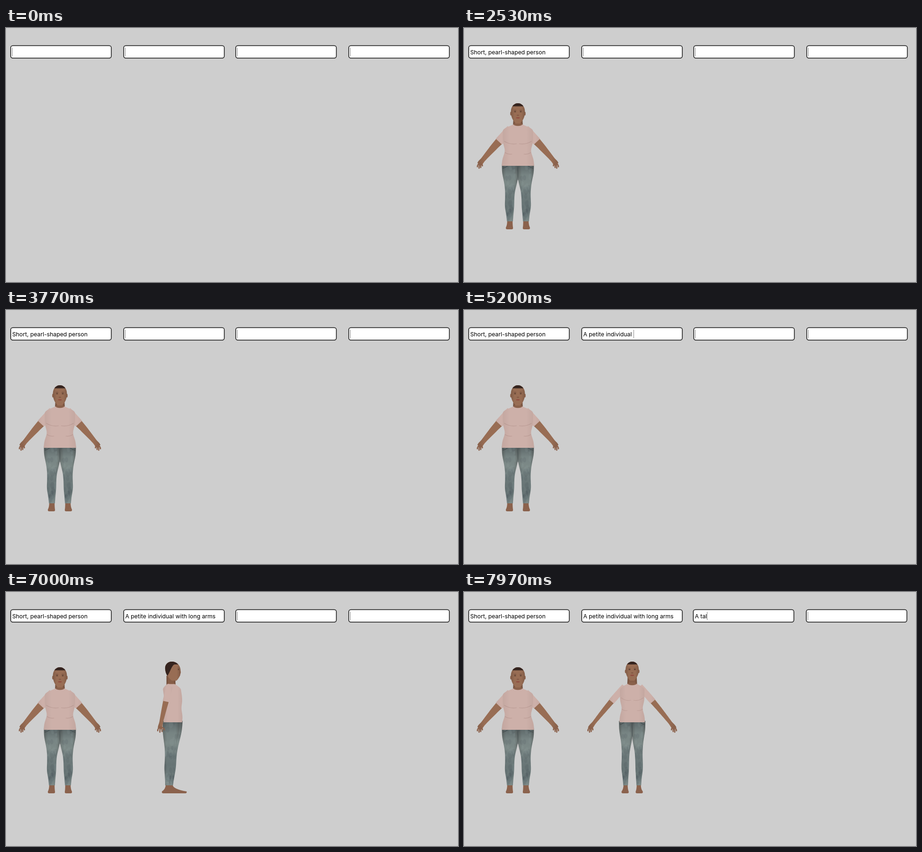
Write an HTML page with a canvas that moves like this. It is 960 by 540 pixels and loops after 8 s.

```html
<!DOCTYPE html>
<html lang="en">
<head>
<meta charset="utf-8">
<title>Body descriptions</title>
<style>
html, body { margin: 0; width: 100%; height: 100%; overflow: hidden; background: #cecece; }
canvas { display: block; }
</style>
</head>
<body>
<canvas id="stage" width="960" height="540"></canvas>
<script>
const ctx = document.getElementById('stage').getContext('2d');
const LOOP = 8000, TURN = 1200, SHIFT_AT = 7700, GROUND = 428, ANKLE_Y = 411;
const SKIN = '#986d54', SHIRT = '#cdb0a9', HAIR = '#35241f', FOOT = '#8b624d';

// cues: [time, characters shown], steady typing in between
const boxes = [
  { x: 10, text: 'Short, pearl-shaped person', done: 2370,
    cues: [[130, 1], [500, 6], [830, 8], [1530, 14], [2230, 26]] },
  { x: 250, text: 'A petite individual with long arms', done: 6500,
    cues: [[3800, 1], [4430, 12], [6370, 34]] },
  { x: 488, text: 'A tal', cues: [[7740, 1], [7950, 5]], shifts: true },
  { x: 728, text: '', cues: [], shifts: true }
];

const people = [
  { cx: 114.5, start: 2530, top: 160, head: 1, collar: 205, hem: 293, chest: 32, dip: 5, flare: 2.5,
    depth: .82, hip: 17, ankle: 6, shoulder: [15, 215], hand: [80, 287], upperArm: 9.5, wrist: 4 },
  { cx: 357.2, start: 6640, top: 148, head: .94, collar: 195, hem: 277, chest: 26, dip: 4, flare: 1,
    depth: .72, hip: 14, ankle: 4.7, shoulder: [16, 201], hand: [88, 287], upperArm: 6.8, wrist: 3.3 }
];

const lerp = (a, b, u) => a + (b - a) * u;
const clamp = u => Math.min(1, Math.max(0, u));
const smooth = u => (u = clamp(u), u * u * (3 - 2 * u));
const bump = (u, mid, width) => Math.exp(-(((u - mid) / width) ** 2));
const sample = (n, f) => Array.from({ length: n + 1 }, (_, i) => f(i / n));

let seed = 7;
const random = () => (seed = seed * 16807 % 2147483647) / 2147483647;
const blotches = sample(70, () => ({ az: random() * 7, v: random(), size: 2 + 4 * random(), light: random() < .5 }));

// Body sections are {x, y, z, a, b}: centre, half width and half depth.
const torsoAt = p => u => {
  const a = 9 + (p.chest - 9) * Math.sin(clamp(u / .16) * Math.PI / 2) -
    p.dip * bump(u, .64, .16) + p.flare * u * u;
  return { x: 0, y: lerp(p.collar, p.hem, u), z: 6 * Math.sin(2.4 * u) - 7, a, b: a * p.depth };
};

const legAt = (p, side) => v => {
  const a = p.ankle + (p.hip - p.ankle) * (1 - smooth((v - .1) / .6) + .35 * bump(v, .7, .2));
  const x = p.hip - 1.5 * bump(v, .3, .15) + .8 * bump(v, .72, .15);
  return { x: x * side, y: lerp(p.hem - 3, ANKLE_Y, v), z: -3 - 8 * v, a, b: a * lerp(1.3, 1.1, v) };
};

const armAt = (p, side) => u => ({
  x: side * (lerp(p.shoulder[0], p.hand[0], u) + 1.5 * Math.sin(Math.PI * u)),
  y: lerp(p.shoulder[1], p.hand[1], u),
  z: lerp(-7, -12, u),
  r: lerp(p.upperArm, p.wrist, u ** 1.4) + 1.4 * bump(u, 1, .07)
});

const skullAt = p => u => {
  const v = u * 43, down = clamp((v - 17) / 26);
  const a = 14.8 * p.head * (v < 17 ? Math.sqrt(1 - ((17 - v) / 17.2) ** 2) : 1 - .7 * down ** 2.5);
  return { x: 0, y: p.top + v * p.head, z: -5 + 5 * u, a, b: a * 1.17 };
};

function fillPolygon(points, fill, shade) {
  const path = new Path2D();
  points.forEach(([x, y]) => path.lineTo(x, y));
  path.closePath();
  ctx.fillStyle = fill;
  ctx.fill(path);
  const xs = points.map(p => p[0]);
  const edge = ctx.createLinearGradient(Math.min(...xs), 0, Math.max(...xs), 0);
  for (const stop of [0, .25, .75, 1]) edge.addColorStop(stop, `rgba(30,20,15,${stop % 1 ? 0 : shade})`);
  ctx.fillStyle = edge;
  ctx.fill(path);
  return path;
}

function ellipse(x, y, rx, ry, fill) {
  ctx.fillStyle = fill;
  ctx.beginPath();
  ctx.ellipse(x, y, rx, ry, 0, 0, 7);
  ctx.fill();
}

function drawPerson(p, angle) {
  const cos = Math.cos(angle), sin = Math.sin(angle);
  const sx = (x, z) => p.cx + x * cos + z * sin;
  const span = ({ a, b }) => Math.hypot(a * cos, b * sin);

  function column(sections, fill, shade) {
    const edge = dir => sections.map(s => [sx(s.x, s.z) + dir * span(s), s.y]);
    return fillPolygon([...edge(-1), ...edge(1).reverse()], fill, shade);
  }

  function tube(sections, fill, shade) {
    const pts = sections.map(s => [sx(s.x, s.z), s.y]);
    const edge = dir => pts.map(([x, y], i) => {
      const a = pts[Math.max(i - 1, 0)], b = pts[Math.min(i + 1, pts.length - 1)];
      const dx = b[0] - a[0], dy = b[1] - a[1], k = dir * sections[i].r / Math.hypot(dx, dy);
      return [x - dy * k, y + dx * k];
    });
    fillPolygon([...edge(-1), ...edge(1).reverse()], fill, shade);
  }

  function drawArm(side) {
    const at = armAt(p, side), [hx, hy] = p.hand;
    tube(sample(30, u => at(lerp(.25, 1.04, u))), SKIN, .15);
    ctx.strokeStyle = '#8c624c';
    ctx.lineWidth = 2.7;
    ctx.lineCap = 'round';
    ctx.beginPath();
    for (let finger = 0; finger < 4; finger++) {
      const x = sx((hx + 6 - 3.5 * finger) * side, 4 * finger - 16);
      const length = 8 + 3 * Math.sin(finger * 1.3);
      ctx.moveTo(sx(hx * side, -11), hy);
      ctx.quadraticCurveTo(x, hy + length * .3, x, hy + length);
    }
    ctx.stroke();
    tube(sample(10, u => {
      const s = at(u * .37);
      return { ...s, r: s.r + lerp(0, .8, u) };
    }), SHIRT, .04);
  }

  function drawFoot(side) {
    const c = sx(p.hip * side, -11), heel = sx(p.hip * side, -17), toe = sx((p.hip + 2) * side, 17);
    const lo = Math.min(heel, toe) - 6.5, hi = Math.max(heel, toe) + 6.5, w = p.ankle - .3;
    ctx.fillStyle = FOOT;
    ctx.beginPath();
    ctx.moveTo(c - w, ANKLE_Y - 2);
    ctx.quadraticCurveTo(c - w, GROUND - 9, lo, GROUND - 4);
    ctx.quadraticCurveTo(lo - 1, GROUND, lo + 3, GROUND);
    ctx.lineTo(hi - 3, GROUND);
    ctx.quadraticCurveTo(hi + 1, GROUND, hi, GROUND - 4);
    ctx.quadraticCurveTo(c + w, GROUND - 9, c + w, ANKLE_Y - 2);
    ctx.fill();
  }

  function drawLeg(side) {
    drawFoot(side);
    const at = legAt(p, side);
    const denim = ctx.createLinearGradient(0, p.hem, 0, ANKLE_Y);
    ['#5f6a6b', '#778483', '#7c8987', '#6f7c7c', '#677475', '#6d7a7a', '#7d8a88']
      .forEach((color, i, all) => denim.addColorStop(i / (all.length - 1), color));
    const leg = column(sample(40, at), denim, .22);
    ctx.save();
    ctx.clip(leg);
    for (const { az, v, size, light } of blotches) {
      const facing = Math.cos(az + angle);
      if (facing < 0) continue;
      const s = at(v), x = sx(s.x, s.z) + span(s) * Math.sin(az + angle);
      ellipse(x, s.y, size * facing, size * 1.6, light ? 'rgba(160,175,172,.1)' : 'rgba(50,65,68,.1)');
    }
    ctx.restore();
  }

  function drawHead() {
    const k = p.head, y = v => p.top + v * k;
    const cx = sx(0, -4), r = span({ a: 14.8, b: 17.3 }) * k;
    const onFace = az => [cx + r * Math.sin(az + angle), Math.cos(az + angle)];
    for (const side of [-1, 1]) ellipse(onFace(side * 1.57)[0], y(22), 1.6, 4 * k, '#8a604b');
    if (Math.abs(sin) > .4) ellipse(cx + 17 * k * sin, y(24), 2.4, 3, SKIN);
    const head = column(sample(40, skullAt(p)), SKIN, .2);

    ctx.save();
    ctx.clip(head);
    for (const side of [-1, 1]) {
      const [x, facing] = onFace(side * .42);
      if (facing < .1) continue;
      ellipse(x, y(15), 3.2 * facing, .7, '#6a4a39');
      ellipse(x, y(18), 2.4 * facing, 1.1, '#553a2d');
    }
    const [fx, front] = onFace(0);
    if (front > .1) {
      ellipse(fx, y(25.5), 2.6 * front, 1, '#7d5340');
      ellipse(fx, y(31), 4 * front, 1.3, '#8f4c40');
    }
    // The hairline drops behind the temples to the nape.
    const hairline = az => 6.5 + 26 * smooth((Math.acos(Math.cos(az)) - 1.1) / 1);
    ctx.beginPath();
    ctx.moveTo(cx - 24, y(-2));
    sample(30, u => {
      const az = (u - .5) * Math.PI;
      ctx.lineTo(cx + r * 1.1 * Math.sin(az), y(hairline(az - angle)));
    });
    ctx.lineTo(cx + 24, y(-2));
    ctx.fillStyle = HAIR;
    ctx.fill();
    ctx.restore();
  }

  function drawFolds() {
    if (cos < .5) return;
    const fold = (x1, y1, x2, y2, sag, color) => {
      ctx.strokeStyle = color;
      ctx.lineWidth = 1.2;
      ctx.beginPath();
      ctx.moveTo(sx(x1, 0), y1);
      ctx.quadraticCurveTo(sx((x1 + x2) / 2, 0), (y1 + y2) / 2 + sag, sx(x2, 0), y2);
      ctx.stroke();
    };
    const { hem, chest, dip } = p, crease = `rgba(120,80,75,${.05 * (dip - 1) * cos})`;
    for (const side of [-1, 1]) {
      fold(side * chest * .9, hem - 52, side * 3, hem - 47, 5, crease);
      fold(side * chest * .85, hem - 28, side * chest * .4, hem - 25, 3, crease);
      fold(side * chest, hem + 5, side * chest * .7, hem + 1, 1, 'rgba(45,55,58,.6)');
    }
    fold(0, hem + 1, 0, hem + 30, 0, 'rgba(50,62,65,.5)');
  }

  // Parts on the far side go first.
  const near = sin > 0 ? -1 : 1, armsBehind = cos > .9;
  drawArm(-near);
  if (armsBehind) drawArm(near);
  drawLeg(-near);
  drawLeg(near);
  column(sample(4, u => ({ x: 0, y: lerp(p.top + 32 * p.head, p.collar + 4, u), z: -7, a: 9.5 + u, b: 9.5 })), '#865d47', .2);
  column(sample(40, torsoAt(p)), SHIRT, .06);
  if (cos > 0) ellipse(sx(0, -5), p.collar, 9, 3.2 * cos, '#8a614b');
  drawFolds();
  if (!armsBehind) drawArm(near);
  drawHead();
}

function typedCount(cues, t) {
  if (!cues.length || t < cues[0][0]) return 0;
  const next = cues.findIndex(([time]) => t < time);
  if (next < 0) return cues[cues.length - 1][1];
  const [t0, n0] = cues[next - 1], [t1, n1] = cues[next];
  return Math.floor(lerp(n0, n1, (t - t0) / (t1 - t0)));
}

function drawBox(box, t) {
  const x = box.x - (box.shifts && t >= SHIFT_AT ? 1 : 0);
  ctx.beginPath();
  ctx.roundRect(x, 37.5, 213.6, 26.5, 4.5);
  ctx.fillStyle = '#fff';
  ctx.fill();
  ctx.strokeStyle = '#161616';
  ctx.lineWidth = 1.5;
  ctx.stroke();

  const shown = box.text.slice(0, typedCount(box.cues, t));
  ctx.font = '12.28px Inter, "Open Sans", sans-serif';
  ctx.fillStyle = '#000';
  ctx.fillText(shown, x + 3.2, 55.5);
  if (t < (box.done || LOOP)) {
    ctx.fillStyle = '#8a8a8a';
    ctx.fillRect(Math.round(x + 3 + ctx.measureText(shown).width), 42, 1, 18);
  }
}

function draw(t) {
  ctx.fillStyle = '#cecece';
  ctx.fillRect(0, 0, 960, 540);
  boxes.forEach(box => drawBox(box, t));
  for (const p of people) {
    if (t >= p.start) drawPerson(p, 2 * Math.PI * smooth((t - p.start) / TURN));
  }
}

const begin = performance.now();
function tick() {
  draw((performance.now() - begin) % LOOP);
  requestAnimationFrame(tick);
}
tick();
</script>
</body>
</html>
```
